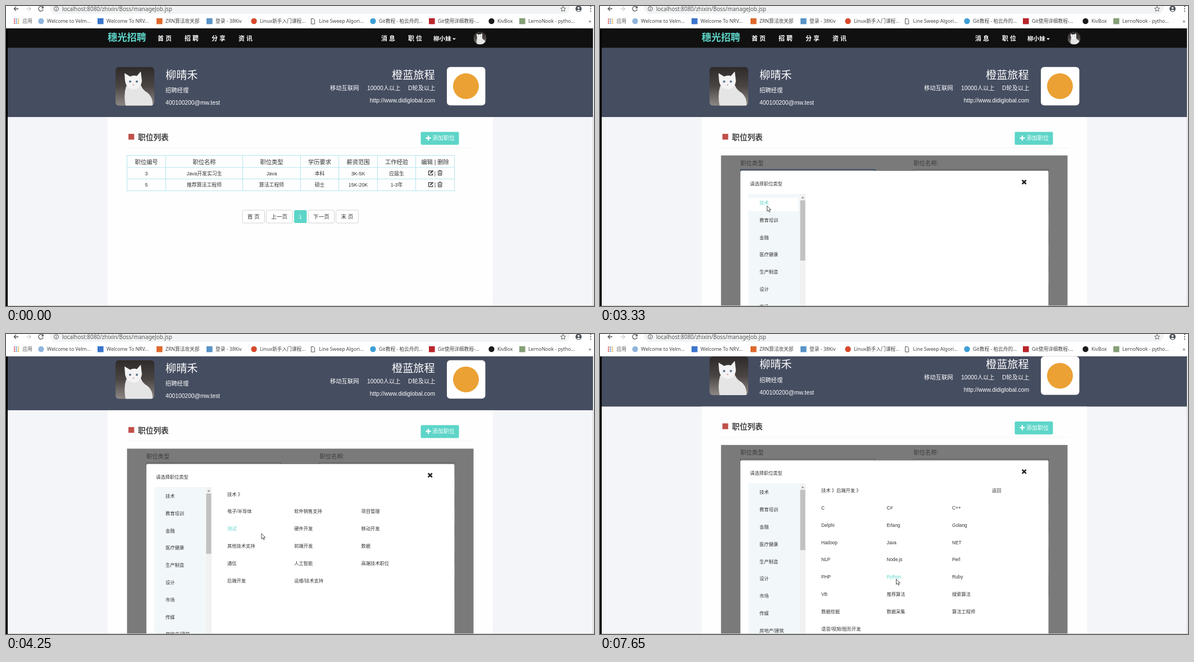
These frames come from a looping animation (1047x535 px, 8 s). An HTML page:

```html
<!DOCTYPE html>
<html lang="zh-CN">
<head>
<meta charset="utf-8">
<title>职位列表</title>
<style>
html, body { margin: 0; width: 100%; height: 100%; overflow: hidden; background: #fff; }
svg { display: block; width: 1047px; height: 535px; }
text { font-family: "Liberation Sans", "Noto Sans CJK SC", "Noto Sans CJK", sans-serif; white-space: pre; }
.ui text { font-family: "Noto Sans", "Noto Sans CJK SC", "Noto Sans CJK", sans-serif; }
</style>
</head>
<body>
<svg id="stage" xmlns="http://www.w3.org/2000/svg"></svg>
<script>
const TEAL = '#5dd5c8', INK = '#333', ROW = 30.8, LOOP = 8000;

// y is the visual middle of the line
const text = (x, y, size, str, fill = INK, extra = '') =>
  `<text x="${x}" y="${y + size * .37}" font-size="${size}" fill="${fill}" ${extra}>${str}</text>`;
const mid = (x, y, size, str, fill = INK) => text(x, y, size, str, fill, 'text-anchor="middle"');
const rect = (x, y, w, h, fill, extra = '') =>
  `<rect x="${x}" y="${y}" width="${w}" height="${h}" fill="${fill}" ${extra}/>`;
const path = (d, stroke, width = 1, extra = '') =>
  `<path d="${d}" fill="none" stroke="${stroke}" stroke-width="${width}" ${extra}/>`;
const shape = (d, fill, extra = '') => `<path d="${d}" fill="${fill}" ${extra}/>`;
const circle = (x, y, r, fill, extra = '') => `<circle cx="${x}" cy="${y}" r="${r}" fill="${fill}" ${extra}/>`;
const group = (id, body, extra = '') => `<g id="${id}" ${extra}>${body}</g>`;

const defs = `<defs>
  <clipPath id="tile"><rect width="69" height="69" rx="6"/></clipPath>
  <clipPath id="disc"><circle cx="34.5" cy="34.5" r="34.5"/></clipPath>
  <linearGradient id="dusk" x2="0" y2="1">
    <stop stop-color="#2e2a29"/><stop offset=".5" stop-color="#4a4543"/><stop offset="1" stop-color="#8d8885"/>
  </linearGradient>
  <g id="cat">
    ${rect(0, 0, 69, 69, 'url(#dusk)')}
    ${shape('M19 34Q14 50 18 69H66Q67 54 57 46Q46 40 44 28Z', '#e6e5e5')}
    ${shape('M17 25L16 11L26 17Q32 14 38 16L45 8L47 25Q45 39 32 40Q19 38 17 25Z', '#f4f3f3')}
    ${circle(26, 26, 2, '#56728a')}${circle(38, 26, 2, '#56728a')}${circle(32, 32, 1.3, '#d3a9a4')}
  </g></defs>`;

const bookmarks = [
  [62, '#8fb6dc', 'Welcome to Velm...', 1], [168, '#3a76cc', 'Welcome To NRV...'],
  [273, '#dd6a2c', 'ZRN算法攻关部'], [362, '#5a94c8', '登录 - 38Kiv'],
  [441, '#d84a2c', 'Linux新手入门课程...', 1], [546.5, '', 'Line Sweep Algori...'],
  [653, '#3d9fd6', 'Git教程 - 柏云舟的...', 1], [758, '#b9252b', 'Git使用详细教程-...'],
  [864, '#1b1b1b', 'KivBox', 1], [919, '#85a078', 'LernoNook - pytho...']];

function browser() {
  let s = rect(0, 0, 1047, 40, '#fff') + rect(78, -12, 926, 26, '#f1f3f4', 'rx="12"') +
    path('M22 5H14.5M18 1.3L14.3 5L18 8.7', '#555', 1.3) +
    path('M36 5H44M40.5 1.3L44.2 5L40.5 8.7', '#c4c4c4', 1.2) +
    path('M65.6 2.5A4.2 4.2 0 1 0 66.2 6M66.3 .5V3.5H63.2', '#555', 1.3) +
    circle(89.5, 5, 3.9, 'none', 'stroke="#555"') + path('M89.5 4.4V7.2M89.5 2.6V3.5', '#555') +
    text(100, 5, 9.9, 'localhost:8080/zhixin/Boss/manageJob.jsp', '#555') +
    path('M992 .5L993.3 3.6L996.6 3.9L994.1 6.1L994.9 9.4L992 7.6L989.1 9.4L989.9 6.1L987.4 3.9L990.7 3.6Z', '#555', .9) +
    circle(1019.5, 5, 5.5, '#50545a') + circle(1019.5, 3.5, 1.8, '#fff') + shape('M1016 8.3Q1019.5 5 1023 8.3L1019.5 9.8Z', '#fff') +
    [1, 5, 9].map(y => circle(1041, y, 1.1, '#555')).join('');
  for (let i = 0; i < 9; i++)
    s += rect(14 + i % 3 * 3.5, 22.5 + (i / 3 | 0) * 3.5, 2.2, 2.2, ['#d9534f', '#5a8fd8', '#e0b040'][i % 3]);
  s += text(29.5, 26.5, 8.7, '应用', '#555');
  for (const [x, color, label, round] of bookmarks) {
    s += !color ? path(`M${x - 3} 22.5H${x + 1}L${x + 3.2} 25V32H${x - 3}Z`, '#555')
      : round ? circle(x + .5, 27, 5.2, color) : rect(x - 5, 21.8, 10.6, 10.6, color);
    s += text(x + 11, 27, 8.7, label, '#444');
  }
  return s + text(1037.5, 26.5, 9, '»', '#444') + rect(0, 39, 1047, 1, '#ddd') +
    rect(0, 40, 3, 495, '#000') + rect(1045, 40, 2, 495, '#fff') + rect(1045, 40, 1, 495, '#c8c8c8') +
    rect(3, 534, 1044, 1, '#c8c8c8');
}

function header() {
  const nav = [[270, '首 页'], [318, '招 聘'], [366, '分 享'], [414, '资 讯'], [668, '消 息'], [716, '职 位']];
  return rect(0, 74, 1047, 124, '#454d60') + rect(0, 40, 1047, 34.5, '#101010') +
    text(181, 56, 17.2, '穗光招聘', TEAL, 'font-weight="700"') +
    nav.map(([x, s]) => text(x, 57.5, 10.9, s, '#fff', 'font-weight="700"')).join('') +
    text(761, 58, 10.6, '柳小妹', '#fff', 'font-weight="700"') + shape('M795 57.5H801L798 60.5Z', '#fff') +
    '<use href="#cat" clip-path="url(#disc)" transform="translate(832.5 45.5) scale(.334)"/>' +
    '<use href="#cat" clip-path="url(#tile)" transform="translate(195 108.7)"/>' +
    text(284, 122.5, 19.2, '柳晴禾', '#fff', 'font-weight="300"') +
    text(284, 150.5, 10.3, '招聘经理', '#fff') + text(284, 172.5, 10.3, '400100200@mw.test', '#fff') +
    text(687, 122.5, 19.2, '橙蓝旅程', '#fff', 'font-weight="300"') +
    text(577, 146, 10.3, '移动互联网', '#fff') + text(643, 146, 10.3, '10000人以上', '#fff') +
    text(716, 146, 10.3, 'D轮及以上', '#fff') +
    text(764, 168, 10.3, 'http://www.didiglobal.com', '#fff', 'text-anchor="end"') +
    rect(785, 108.7, 68.5, 68.5, '#fff', 'rx="6"') + circle(819, 143, 23, '#eba134');
}

function titleBar() {
  return rect(181, 198, 686, 700, '#fefefe') + rect(218, 228, 10.3, 10.3, '#c0514a') +
    text(235, 234, 13.7, '职位列表', '#444', 'font-weight="700"') + rect(217, 252.5, 616, 1, '#f4f4f4') +
    rect(738.5, 224.5, 68, 23, TEAL, 'id="add" rx="2"') +
    path('M752 231V240M747.5 235.5H756.5', '#fff', 2.4) + text(759, 235.5, 10, '添加职位', '#fff');
}

function jobTable() {
  const xs = [215.5, 284.5, 421.5, 524.5, 592.5, 661.5, 729.5, 798.5], ys = [266.5, 288, 308.5, 329.5];
  const rows = [
    ['职位编号', '职位名称', '职位类型', '学历要求', '薪资范围', '工作经验', '编辑 | 删除'],
    ['3', 'Java开发实习生', 'Java', '本科', '3K-5K', '应届生', '|'],
    ['5', '推荐算法工程师', '算法工程师', '硕士', '15K-20K', '1-3年', '|']];
  let s = path(xs.map(x => `M${x} 266V330`).join('') + ys.map(y => `M215 ${y}H799`).join(''), '#b3e5ee');
  rows.forEach((row, r) => row.forEach((label, c) =>
    s += mid((xs[c] + xs[c + 1]) / 2, [278, 298.3, 319][r], r ? 8.9 : 10.3, label)));
  for (const y of [297.5, 318.3])
    s += path(`M758.5 ${y - 3.4}H752.6V${y + 3.8}H759.6V${y + 1}`, INK, 1.2) +
      path(`M755.5 ${y + 1}L760.5 ${y - 4}`, INK, 1.8) +
      path(`M768.5 ${y - 3}H777M771 ${y - 4.4}H774.5M769.6 ${y - 2}V${y + 4.4}H775.8V${y - 2}M771.7 ${y - 1}V${y + 3}M773.8 ${y - 1}V${y + 3}`, INK);
  const pages = [[421, 39.5, '首 页'], [463.5, 46.5, '上一页'], [513, 22.5, '1'], [538.5, 46, '下一页'], [587.5, 40, '末 页']];
  for (const [x, w, label] of pages) {
    const on = label === '1';
    s += rect(x, 364, w, 23, on ? TEAL : '#fff', `rx="2.5" stroke="${on ? 'none' : '#d2d2d2'}"`) +
      mid(x + w / 2, 375.5, 9.6, label, on ? '#fff' : INK);
  }
  return s;
}

function jobForm() {
  const box = (x, y, w, h = 24, extra = '') => rect(x + .5, y + .5, w - 1, h - 1, '#fff', `stroke="#bbb" ${extra}`);
  const arrow = (x, y) => shape(`M${x - 2} ${y - 1.5}H${x + 2}L${x} ${y + 2}Z`, '#222');
  const select = (x, y, w, label) => box(x, y, w) + arrow(x + w - 7.5, y + 12) + text(x + 3.5, y + 12, 9.6, label);
  const labels = [[250, 280, '职位类型'], [558.5, 280, '职位名称:'], [250, 335, '学历要求:'], [558.5, 335, '工作经验'],
    [250, 390, '薪资范围'], [558.5, 390, '工作城市'], [250, 438, '详细地址'], [250, 486, '职位要求']];
  return rect(215.5, 266.5, 617, 500, '#f5f5f7') +
    labels.map(([x, y, s]) => text(x, y, 10.3, s, '#777')).join('') +
    box(250, 291, 240, 24, 'id="kind"') + box(558, 291, 241) + text(560, 303, 9.6, '例如：Java开发实习生', '#777') +
    select(250, 346, 240, '不限') + select(558, 346, 241, '不限') + select(250, 401, 240, '不限') +
    box(558, 401, 114) + select(685, 400, 114, '') + box(250, 449, 549) + box(250, 497, 549, 39) +
    path('M793 534.5L797.5 530M795.5 534.5L797.5 532.5', '#999', .8);
}

const fields = '技术 教育培训 金融 医疗健康 生产制造 设计 市场 传媒 房地产/建筑'.split(' ');
const branches = ('电子/半导体 软件销售支持 项目管理 测试 硬件开发 移动开发 其他技术支持 前端开发 数据 ' +
  '通信 人工智能 高端技术职位 后端开发 运维/技术支持').split(' ');
const skills = ('C C# C++ Delphi Erlang Golang Hadoop Java NET NLP Node.js Perl PHP Python Ruby ' +
  'VB 推荐算法 搜索算法 数据挖掘 数据采集 算法工程师 语音/视频/图形开发').split(' ');
const cells = [];

function grid(labels, x, y, cols, pitch) {
  return labels.map((label, i) => {
    const cx = x + i % cols * pitch, cy = y + (i / cols | 0) * ROW;
    cells.push({ x: cx, y: cy, w: pitch });
    return text(cx, cy, 8.25, label, INK, 'class="cell"');
  }).join('');
}

function modal() {
  return rect(215.5, 266.5, 617, 500, '#000', 'opacity=".5"') + rect(250, 294, 548.5, 400, '#fff', 'rx="2"') +
    text(267, 317, 8.25, '请选择职位类型') + path('M751.7 310.5L758.7 317.5M758.7 310.5L751.7 317.5', '#222', 2.6) +
    rect(264, 335, 92, 330, '#f2f7fa') + rect(264, 342, 89, 24, '#fff', 'id="glow"') +
    rect(356, 335, 10, 330, '#f1f1f1') + shape('M358.5 343H363.5L361 340Z', '#888') + rect(356.5, 346.5, 9, 107.5, '#c1c1c1') +
    grid(fields, 284, 351, 1, 69) +
    group('branches', text(394, 347.8, 8.25, '技术 》') + grid(branches, 394, 378.5, 3, 119.2)) +
    group('skills', text(394, 347.8, 8.25, '技术 》后端开发 》') + text(698, 347.8, 8.25, '返回') +
      grid(skills, 394, 378.5, 3, 116.5));
}

const cursors =
  group('arrow', shape('M0 0V9.5L2.2 7.6L3.8 11L5.3 10.3L3.8 7H6.8Z', '#fff', 'stroke="#222" stroke-width=".8"')) +
  group('hand', shape('M2.6 6.5V1Q3.5 -.4 4.4 1V4.5L8.6 5.6Q9.4 6 9 8.4L8.2 11.6H3.8L.4 7.4Q.8 5.6 2.6 7.4Z', '#fff', 'stroke="#222" stroke-width=".8"')) +
  group('beam', path('M-2 -4.5H2M0 -4.5V4.5M-2 4.5H2', '#333'));

stage.innerHTML = defs + rect(0, 0, 1047, 535, '#f4f5f8') +
  group('page', header() + titleBar() + group('list', jobTable()) + group('form', jobForm()) + group('picker', modal())) +
  group('browser', browser(), 'class="ui"') + group('pointer', cursors);

const $ = id => document.getElementById(id);
const show = (id, on) => $(id).setAttribute('display', on ? 'inline' : 'none');
const cellEls = [...document.querySelectorAll('.cell')];

// time, x, y
const route = [[110, 178, 494], [880, 759, 231], [1040, 761, 231], [1220, 764, 233], [1350, 772, 236], [1500, 772, 236],
  [1650, 762, 243], [2400, 336, 307], [2860, 336, 307], [3330, 297.5, 356.5], [3650, 297.5, 356.5], [3840, 312, 356],
  [4170, 443.5, 352.5], [4570, 500, 369], [5030, 398.5, 434], [5250, 398.5, 434], [5970, 420, 402], [6050, 423.5, 401.5],
  [6300, 449, 397], [6530, 448, 401], [6700, 448, 401], [7480, 527.5, 437]];
const wheel = [[4090, 0], [4170, 44.5], [4260, 64], [4330, 68.6]];

function along(keys, t) {
  const i = keys.findIndex(k => k[0] > t);
  if (i < 1) return keys.at(i).slice(1);
  const a = keys[i - 1], b = keys[i], p = (t - a[0]) / (b[0] - a[0]);
  return a.slice(1).map((v, n) => v + (b[n + 1] - v) * p);
}

function draw(t) {
  const [x, y] = along(route, t), [scroll] = along(wheel, t), py = y + scroll;
  const form = t >= 1650, picker = t >= 2540, skillsOpen = t >= 5200;
  const overAdd = !form && x > 738 && x < 807 && y > 225 && y < 247;
  const focused = t >= 1500 && !picker;

  $('page').setAttribute('transform', `translate(0 ${-scroll})`);
  show('list', !form);
  show('form', form);
  show('picker', picker);
  show('branches', t >= 3520 && !skillsOpen);
  show('skills', skillsOpen);

  $('add').setAttribute('fill', overAdd || focused ? '#58cec2' : TEAL);
  $('add').setAttribute('stroke', focused ? '#5b9fdc' : 'none');
  $('kind').setAttribute('stroke', picker && t < 3520 ? '#3c6fd0' : '#bbb');

  const over = cells.map(c => picker && x >= c.x - 20 * (c.x < 300) && x < c.x + c.w && py > c.y - 9 && py < c.y + 15);
  cellEls.forEach((el, i) => el.setAttribute('fill', over[i] ? TEAL : INK));
  const row = over.slice(0, fields.length).indexOf(true);
  show('glow', row >= 0);
  $('glow').setAttribute('y', 342 + ROW * row);

  const beam = t >= 2250 && t < 2900;
  show('pointer', t >= 110);
  show('beam', beam);
  show('hand', overAdd);
  show('arrow', !beam && !overAdd);
  $('pointer').setAttribute('transform', `translate(${x} ${y})`);
}

function tick() {
  draw(performance.now() % LOOP);
  requestAnimationFrame(tick);
}
tick();
</script>
</body>
</html>
```
